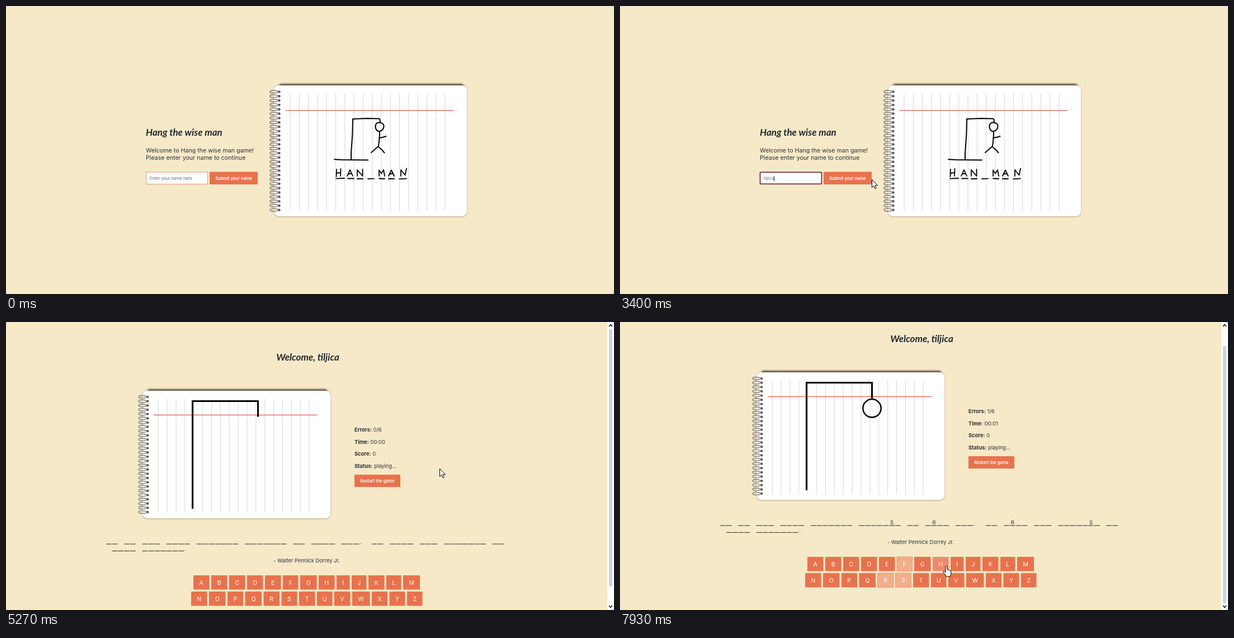
Recreate the animation shown at these times as an HTML page. Size 1087 px wide and 515 px high, loop 8000 ms.

```html
<!DOCTYPE html>
<html lang="en">
<head>
<meta charset="utf-8">
<title>Hang the wise man</title>
<style>
  html, body { margin: 0; width: 100%; height: 100%; overflow: hidden; background: #dbe0ea; }
  svg { display: block; width: 100vw; height: 100vh; font-family: Inter, sans-serif; fill: #2d3038; }
  .title { font: italic 700 17px Caveat, Lato, sans-serif; fill: #22262e; }
  .body { font-size: 10.67px; }
  .info { font-size: 9.33px; }
  .info b, .bold { font-weight: 700; }
  .small { font-size: 7.47px; fill: #666a70; }
  .label { font-size: 7.47px; font-weight: 600; fill: #fff; text-anchor: middle; }
  .key { font-size: 10.67px; fill: #fff; text-anchor: middle; }
  .mid { text-anchor: middle; }
  .line { fill: none; stroke: #000; stroke-linecap: round; stroke-linejoin: round; }
</style>
</head>
<body>
<svg viewBox="0 0 1087 515" preserveAspectRatio="none">
  <defs>
    <clipPath id="window"><rect width="1087" height="515" rx="8"/></clipPath>
    <g id="book">
      <rect x="9" y="-3" width="330" height="20" rx="4" fill="#5d5040" style="filter:blur(1.4px)"/>
      <rect width="345" height="235" rx="9" fill="#8a7a5c" opacity=".6" style="filter:blur(1.8px)"/>
      <rect width="345" height="234" rx="9" fill="#fff"/>
      <path id="rules" stroke="#d6d6d6"/>
      <path d="M20.5 44.6H321" stroke="#f0594e" stroke-width="1.4"/>
      <g id="rings"></g>
    </g>
  </defs>
  <g clip-path="url(#window)">
    <rect width="1087" height="515" fill="#f6e9c8"/>

    <g id="login">
      <text class="title" x="250" y="232">Hang the wise man</text>
      <text class="body" x="250" y="262.4">Welcome to Hang the wise man game!</text>
      <text class="body" x="250" y="275.2">Please enter your name to continue</text>
      <rect id="field" fill="#fff"/>
      <text id="typed" class="small" x="257" y="311"></text>
      <rect id="caret" y="304" width="1" height="9" fill="#222"/>
      <rect id="submit" x="364" y="296.5" width="86" height="22.5"/>
      <text class="label" x="407" y="311">Submit your name</text>
      <use href="#book" x="479" y="142"/>
      <g id="sketch" class="line" stroke-width="2">
        <path d="M617 275V262Q620 232 620 202L645 201 667 201.5Q669.5 202 668.5 208M587 274.3L600 275 647 275.6"/>
        <path d="M667 208.5C661 208 659 215 661.5 220C664 226 672 225 675 218C677 212 673 208 667 208.5Z"/>
        <path d="M668 225Q668 240 665.5 252M667 236Q674 235 679.5 233M665 251.5L653 262M665 251.5Q672 256 676.5 262.5"/>
        <path stroke-width="1.8" d="M591 292L590.5 305M598.5 291L598 304M590.5 299L598 298M610 304L615 293 620 304M612 300.500L618 299.500M628 304V293L637.500 304V292M667 304V293.500L671 299.500 675 293 677 304M684 304L689 293.500 694 304M686 300.500L692 299.500M706 304V293L713.500 302.500 716 290.500"/>
        <path stroke-width="1.8" d="M590 308.7L605 308M611 308.500H622M628 309H638M647 309.200L658 308.600M667 308.500L677 309M684 309H694M703 309.300L716 308.700"/>
      </g>
    </g>

    <g id="game">
      <g id="page">
        <text id="hello" class="title mid" x="539.5" y="69"></text>
        <use href="#book" transform="translate(244 123) scale(.974)"/>
        <path d="M333.500 334V141.500H450.500V169.500" fill="none" stroke="#000" stroke-width="3"/>
        <circle id="head" cx="450.5" cy="187.3" r="16.2" fill="none" stroke="#000" stroke-width="2.5"/>
        <g id="stats" class="info"></g>
        <rect x="623" y="273" width="82" height="22" fill="#e9724c"/>
        <text class="label" x="664" y="286.7">Restart the game</text>
        <g id="quote" class="info">
          <path id="dashes" stroke="#222"/>
          <g id="dots" class="mid"></g>
          <g id="found" class="mid"></g>
          <text class="mid" x="537.5" y="429.5">- Walter Pennick Dorrey Jr.</text>
        </g>
        <g id="keys"></g>
      </g>
      <rect x="1075" width="12" height="515" fill="#fdfdfd"/>
      <rect id="thumb" x="1078" width="6" rx="2" fill="#c9d4e2"/>
      <path d="M1078.500 7.500l2.500-3 2.500 3M1078.500 507.500l2.500 3 2.500-3" class="line" stroke="#555" stroke-width="1.4"/>
    </g>
    <path id="cursor" stroke="#000" fill="#fff" stroke-linejoin="round"/>
  </g>
</svg>
<script>
const $ = id => document.getElementById(id);
const set = (el, attrs) => { for (const k in attrs) el.setAttribute(k, attrs[k]); };
const show = (id, on) => { $(id).style.display = on ? '' : 'none'; };
const range = (n, f) => Array.from({ length: n }, (_, i) => f(i));
const ramp = (t, a, b) => Math.min(1, Math.max(0, (t - a) / (b - a)));
const ease = u => u * u * (3 - 2 * u);

const LOOP = 8000, ORANGE = '#e9724c', HOVER = '#f08a69', USED = '#f3ae89';
const NAME = 'tiljica';
const KEY_TIMES = [2725, 2865, 3065, 3195, 3265, 3268, 3395];
const FOCUS = 2065, LEAVE = 4465, ENTER = 4525, LOADED = 4860;
const PICKED = { F: 6320, S: 6665, R: 7125 };

const SHAPES = {
  arrow: 'M0 0V14L3.3 11 5.5 16.2 7.6 15.2 5.4 10.2H10Z',
  hand: 'M-1.6 1.4Q-1.6 0 0 0T1.6 1.4V6.5Q4 5.8 4.3 7.4Q6.3 6.8 6.6 8.2Q8.4 7.8 8.4 9.6V12.5Q8.4 15 7 17V18.5H-.8V17Q-3 14.5-5.6 10.8Q-5.8 8.8-3.8 9.4L-1.6 11.3Z',
  beam: 'M-2.5-7.5H2.5M0-7.5V7.5M-2.5 7.5H2.5'
};

// time, x, y of the pointer
const PATH = [
  [1270, 92, 148], [1600, 296, 289], [1730, 298, 296], [1800, 300, 307], [2070, 300, 307],
  [2325, 450, 310], [4180, 450, 310], [4265, 428, 313], [4850, 428, 313], [5130, 775, 262],
  [5700, 775, 262], [6065, 511, 445], [6315, 511, 445], [6320, 511, 448.5], [6440, 511, 448.5],
  [6465, 511, 462], [6830, 511, 462], [6960, 476, 463], [7150, 476, 463], [7325, 508, 461],
  [7450, 508, 461], [7925, 583, 436]
];

// notebook details
$('rules').setAttribute('d', range(18, i => `M${29 + i * 16.3} 15V224`).join(''));
$('rings').innerHTML = range(28, i => {
  const y = 11 + i * 7.83;
  const wire = `M9 ${y}C0 ${y - 3.5}-7.500 ${y - 2.5}-7 ${y + .6}C-6 ${y + 3.4} 3 ${y + 3} 7 ${y + 1.6}`;
  return `<path d="${wire}" fill="none" stroke="#77726b" stroke-width="1.7"/>
    <path d="${wire}" fill="none" stroke="#c9c5be" stroke-width=".5"/>
    <circle cx="9.500" cy="${y + .4}" r="2.200" fill="#5c5853"/>`;
}).join('');

// hidden quote
const SLOT = 10.79, slotX = i => 179 + i * SLOT;
const ROWS = ['__ __ ___ ____ _______ _______ __ ____ ___. __ ____ ___ _______ __', ' ____ _______.'];
let dashes = '', dots = '';
ROWS.forEach((row, r) => [...row].forEach((c, i) => {
  const x = slotX(i), y = 397 + r * 12.4;
  if (c === '_') dashes += `M${x} ${y}h9.700`;
  if (c === '.') dots += `<text x="${x + 1.8}" y="${y}">.</text>`;
}));
$('dashes').setAttribute('d', dashes);
$('dots').innerHTML = dots;
const HITS = [['S', 28], ['R', 35], ['R', 48], ['S', 61]];
$('found').innerHTML = HITS.map(([c, i]) => `<text x="${slotX(i) + 4.9}" y="394.5">${c}</text>`).join('');

// statistics
const STATS = ['Errors', 'Time', 'Score', 'Status'];
$('stats').innerHTML = STATS.map((s, i) =>
  `<text x="623" y="${196 + i * 21.65}"><tspan class="bold">${s}:</tspan> <tspan id="${s}"></tspan></text>`).join('');
$('Score').textContent = '0';
$('Status').textContent = 'playing...';
$('hello').textContent = `Welcome, ${NAME}`;

// keyboard: left edges, the last number closes the row
const EDGES = [
  [335, 367, 399, 431, 463, 495, 526, 559, 591, 618, 648, 680, 710, 743.5],
  [331, 363, 396, 427.5, 460.5, 492.5, 524, 556, 587, 619, 654, 685.5, 717, 748]
];
const keys = range(26, i => {
  const row = i < 13 ? 0 : 1, e = EDGES[row], j = i % 13;
  return { c: String.fromCharCode(65 + i), x: e[j], w: e[j + 1] - e[j] - 3.5, y: row ? 482 : 453, h: 25.5 };
});
$('keys').innerHTML = keys.map(k =>
  `<rect x="${k.x}" y="${k.y}" width="${k.w}" height="${k.h}"/>
   <text class="key" x="${k.x + k.w / 2}" y="${k.y + 16.5}">${k.c}</text>`).join('');
const keyRects = $('keys').querySelectorAll('rect');

function pointer(t) {
  let i = PATH.findIndex(p => p[0] > t);
  if (i < 0) return PATH[PATH.length - 1].slice(1);
  if (i === 0) return null;
  const [a, x, y] = PATH[i - 1], [b, x2, y2] = PATH[i], u = ease(ramp(t, a, b));
  return [x + (x2 - x) * u, y + (y2 - y) * u];
}

const inside = (p, x, y, w, h) => p && p[0] >= x && p[0] < x + w && p[1] >= y && p[1] < y + h;

function drawLogin(t, p) {
  $('sketch').style.opacity = Math.min(1, Math.abs(t - 1630) / 700);
  const focused = t >= FOCUS;
  set($('field'), focused
    ? { x: 250.5, y: 297.3, width: 110, height: 21, rx: 1.5, stroke: '#720f22', 'stroke-width': 1.6 }
    : { x: 250.5, y: 297, width: 110, height: 21.5, rx: 0, stroke: '#f0906f', 'stroke-width': 1 });
  const count = KEY_TIMES.filter(k => k <= t).length;
  $('typed').textContent = count ? NAME.slice(0, count) : 'Enter your name here';
  const last = count ? KEY_TIMES[count - 1] : FOCUS;
  show('caret', focused && Math.floor((t - last) / 530) % 2 === 0);
  $('caret').setAttribute('x', 257 + (count ? $('typed').getComputedTextLength() : 0));
  const over = inside(p, 364, 296.5, 86, 22.5);
  $('submit').setAttribute('fill', over ? HOVER : ORANGE);
  return over ? 'hand' : inside(p, 250, 296.5, 111, 22.5) ? 'beam' : 'arrow';
}

function drawGame(t, p) {
  const loaded = t >= LOADED, u = ramp(t, 5370, 5465);
  const scroll = 33 * u, lift = loaded ? 0 : -24;
  $('page').setAttribute('transform', `translate(0 ${-scroll})`);
  $('keys').setAttribute('transform', `translate(0 ${lift})`);
  set($('thumb'), { y: 13 + 30 * u, height: loaded ? 460 : 481 });
  show('quote', loaded);
  show('head', t >= PICKED.F);
  $('Errors').textContent = t >= PICKED.F ? '1/6' : '0/6';
  $('Time').textContent = t >= 7265 ? '00:01' : '00:00';
  [...$('found').children].forEach((el, i) => {
    el.style.display = t >= PICKED[HITS[i][0]] ? '' : 'none';
  });
  let shape = 'arrow';
  keys.forEach((k, i) => {
    const used = t >= PICKED[k.c];
    const over = !used && inside(p, k.x, k.y + lift - scroll, k.w, k.h);
    if (over) shape = 'hand';
    set(keyRects[i], { fill: used ? USED : over ? HOVER : ORANGE, stroke: used ? '#e89a75' : 'none' });
  });
  return shape;
}

function draw(t) {
  const p = pointer(t), login = t < LEAVE, game = t >= ENTER;
  show('login', login);
  show('game', game);
  const shape = login ? drawLogin(t, p) : game ? drawGame(t, p) : 'arrow';
  show('cursor', p);
  if (p) set($('cursor'), { d: SHAPES[shape], transform: `translate(${p[0] + .5} ${p[1] + .5})` });
}

const start = performance.now();
function tick() {
  draw((performance.now() - start) % LOOP);
  requestAnimationFrame(tick);
}
tick();
</script>
</body>
</html>
```
